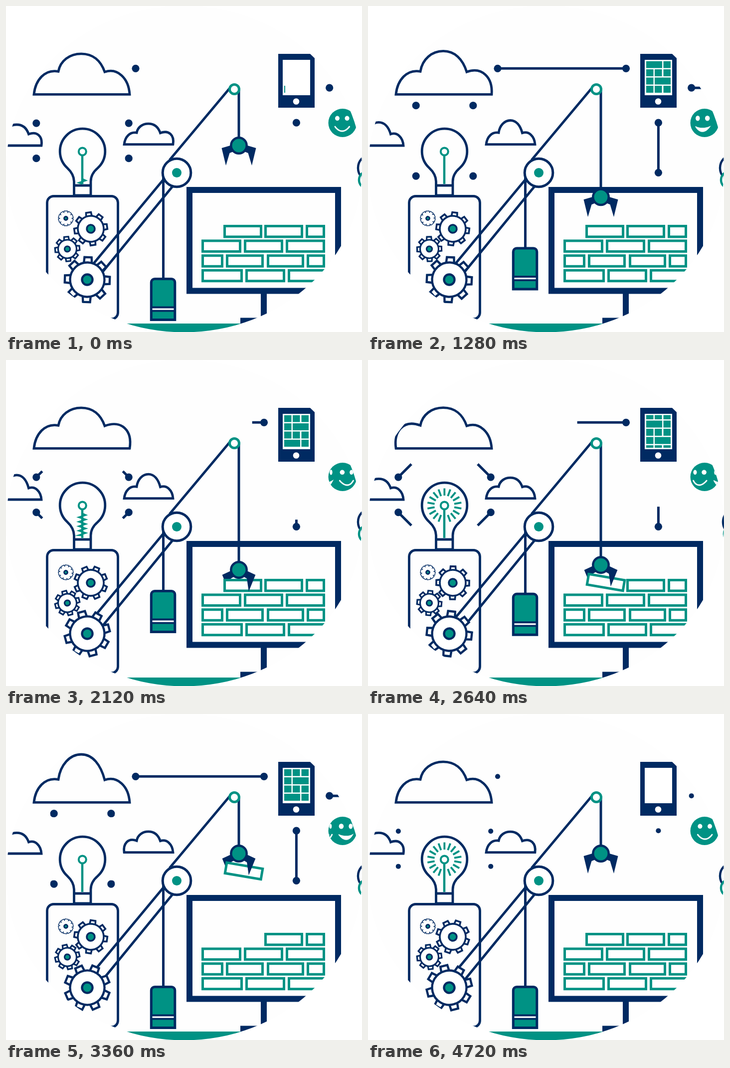
Animation, 714 px wide and 654 px high, one loop 4.76 s. Source, as an HTML page with a canvas:

```html
<!DOCTYPE html>
<html lang="en">
<head>
<meta charset="utf-8">
<title>Idea factory</title>
<style>
html, body { margin: 0; width: 714px; height: 654px; overflow: hidden; background: #fff; }
canvas { display: block; }
</style>
</head>
<body>
<canvas id="stage" width="714" height="654"></canvas>
<script>
const ctx = document.getElementById('stage').getContext('2d');
const NAVY = '#002a62', TEAL = '#009284', WHITE = '#fff';
const LOOP = 4760, STEP = 40, RAD = Math.PI / 180;

const lerp = (a, b, k) => a + (b - a) * k;
const ramp = (t, a, b) => Math.min(1, Math.max(0, (t - a) / (b - a)));
const smooth = (t, a, b) => { const k = ramp(t, a, b); return k * k * (3 - 2 * k); };
const bump = (t, mid, width) => Math.sin(Math.PI * ramp(t, mid - width / 2, mid + width / 2)) ** 2;

function keyed(t, times, values) {
  let i = 0;
  while (i < times.length - 2 && t >= times[i + 1]) i++;
  return lerp(values[i], values[i + 1], ramp(t, times[i], times[i + 1]));
}

function paint(fill, stroke, width = 5) {
  if (fill) { ctx.fillStyle = fill; ctx.fill(); }
  if (stroke) { ctx.strokeStyle = stroke; ctx.lineWidth = width; ctx.stroke(); }
}
function circle(x, y, r, fill, stroke, width) {
  ctx.beginPath(); ctx.arc(x, y, Math.max(0, r), 0, 7); paint(fill, stroke, width);
}
function box(x, y, w, h, fill, stroke, width) {
  ctx.beginPath(); ctx.rect(x, y, w, h); paint(fill, stroke, width);
}
function poly(points, fill, stroke, width) {
  ctx.beginPath(); points.forEach(p => ctx.lineTo(p[0], p[1])); paint(fill, stroke, width);
}
const line = (x1, y1, x2, y2, color = NAVY, width = 5) =>
  poly([[x1, y1], [x2, y2]], null, color, width);
function path(d, fill, stroke, width) {
  const p = new Path2D(d);
  if (fill) { ctx.fillStyle = fill; ctx.fill(p); }
  ctx.strokeStyle = stroke; ctx.lineWidth = width; ctx.stroke(p);
}
function at(x, y, degrees, draw) {
  ctx.save(); ctx.translate(x, y); ctx.rotate(degrees * RAD); draw(); ctx.restore();
}

// The lobes swell one after another: right, top, left.
function cloud(x, y, s, phase) {
  const p = phase % 952;
  const R = 8 * bump(p, 230, 420), T = 15 * bump(p, 485, 530), L = 8 * bump(p, 740, 340);
  const curve = pts => ctx.bezierCurveTo(...pts.map((v, i) => (i % 2 ? y : x) + v * s));
  ctx.beginPath();
  ctx.moveTo(x - 96 * s, y);
  curve([-93 - L, -29 - L / 2, -74 - L, -51 - L, -47, -46]);
  curve([-43, -68 - T / 2, -24, -81.5 - T, -1, -81.5 - T]);
  curve([22, -81.5 - T, 38, -68 - T / 2, 46, -45]);
  curve([72 + R, -54 - R / 2, 94 + R, -32 - R / 2, 96, 0]);
  ctx.closePath();
  paint(null, NAVY, 4.8);
}

// A line shoots from one dot to the other, then back in the next cycle.
const SLOW = { period: 2380, grow: 620, shrink: 1626, time: 608 };
const FAST = { period: 1190, grow: 390, shrink: 710, time: 360 };
function link(t, ax, ay, bx, by, c, soft = 1) {
  const u = t % c.period;
  if (Math.floor(t / c.period) % 2) [ax, ay, bx, by] = [bx, by, ax, ay];
  const ease = (a, b) => lerp(ramp(u, a, b), smooth(u, a, b), soft);
  const head = ease(0, c.grow), tail = ease(c.shrink, c.shrink + c.time);
  if (head > tail) {
    line(lerp(ax, bx, tail), lerp(ay, by, tail), lerp(ax, bx, head), lerp(ay, by, head));
  }
  const dip = Math.min(1, Math.abs(u - c.period + 80) / 60);
  circle(ax, ay, 7.6 * (1 - ramp(u, c.shrink - 60, c.shrink)), NAVY);
  circle(bx, by, 7.6 * ramp(u, c.grow - 60, c.grow) * dip, NAVY);
}

function gear(x, y, r, outer, hub, teeth, angle, width, merged) {
  at(x, y, angle, () => {
    const w = (outer - r) * 0.62 + 0.6;
    const tooth = (fill, stroke) => {
      for (let i = 0; i < teeth; i++) {
        at(0, 0, i * 360 / teeth, () =>
          poly([[-w - 1, 3 - r], [-w, -outer], [w, -outer], [w + 1, 3 - r]], fill, stroke, width));
      }
    };
    tooth(WHITE, NAVY);
    circle(0, 0, r, WHITE, NAVY, width);
    if (merged) { tooth(WHITE); circle(0, 0, r, WHITE); }
    circle(0, 0, hub, TEAL, NAVY, width);
  });
}

function gears(t) {
  const times = [0, 1280, 2120, 2640, 3360, 4120, 4720, LOOP];
  const turn = t / LOOP;
  gear(120, 426, 10.5, 14, 3.5, 10, -144 * turn, 2.8, true);
  gear(170, 447, 26, 33, 8, 8, keyed(t, times, [-8, -38, -68, -89, -127, -158, -161, -188]), 3.6);
  gear(123, 487.5, 18.5, 24.5, 5.5, 8, -5 + 180 * turn, 3.2);
  gear(163, 549, 34.5, 45, 10.5, 8, keyed(t, times, [2, 48, 75, 96, 112, 126, 166, 182]), 4.4);
}

function bulb(t) {
  const p = t % 952;
  path('M136.5 380V352Q136 337 123 325A45.3 45.3 0 1 1 184 325Q170 337 170 352V380ZM136.5 360H170',
    null, NAVY, 4.8);
  line(153, 299, 153, 357, TEAL, 4.5);
  circle(153.3, 292, 7.5, null, TEAL, 4);
  if (p < 320) {
    const top = lerp(347, 308, smooth(p, 0, 200)), pts = [[153, top]];
    const bottom = lerp(357, 352, ramp(p, 0, 200));
    for (let y = top + 3, side = 1; y < bottom; y += 4.5, side = -side) pts.push([153 + side * 7, y]);
    pts.push([153, bottom]);
    poly(pts, null, TEAL, 3);
  }
  const glow = smooth(p, 560, 680) * (1 - smooth(p, 920, 950));
  if (glow > 0) {
    for (let i = 1; i < 18; i++) {
      at(153.3, 292, i * 20, () => line(0, 20, 0, lerp(20, 34.5, glow), TEAL, 3.8));
    }
  }
}

function phone(t) {
  box(546, 96, 73, 108, NAVY);
  box(555, 108, 55, 71, WHITE);
  circle(582, 191.5, 6.3, WHITE);
  const rows = [[0, 32, 34.5, 49], [0, 14.5, 17, 31.5, 34.5, 49], [0, 14.5, 17, 49], [0, 14.5, 17, 31.5, 34.5, 49]];
  const scroll = smooth(t, 1400, 1850) + 4 * smooth(t, 2140, 3040);
  const first = Math.floor(scroll);
  ctx.save();
  box(555, 110.5, 55, 65.5); ctx.clip();
  for (let i = 0; i < 5; i++) {
    const k = 3 - i;
    const shown = ramp(t, k * 120 - 8, k * 120 + 192) - ramp(t, 4000 - i * 100, 4150 - i * 100);
    const cells = rows[(first + i) % 4], y = 110.5 + (first + i - scroll) * 16.5;
    if (i === 4 && scroll === first) break;
    for (let j = 0; j < cells.length; j += 2) {
      const w = Math.min(cells[j + 1], 49 * shown) - cells[j];
      if (w > 0) box(558 + cells[j], y, w, 14, TEAL);
    }
  }
  ctx.restore();
}

// Two faces pass by on a turning ball.
function face(t) {
  const u = t % 2380;
  circle(675, 234.5, 28.5, TEAL);
  ctx.save();
  circle(675, 234.5, 28.5); ctx.clip();
  ctx.lineCap = 'round';
  for (let i = 0; i < 4; i++) {
    const turn = (i * 1190 - 20 - u) * 0.08, grin = i % 2;
    if (Math.abs(turn) > 85) continue;
    const px = a => 675 + 28 * Math.sin(Math.max(-90, Math.min(90, turn + a)) * RAD);
    for (const a of [-20.5, 20.5]) {
      const squash = Math.cos((turn + a) * RAD);
      if (squash <= 0) continue;
      ctx.beginPath();
      ctx.ellipse(px(a), 225.3, 4.8 * squash, grin ? 5.2 : 4.8, 0, 0, 7);
      paint(WHITE);
    }
    const curve = depth => Array.from({ length: 13 }, (_, k) => {
      const v = k / 6 - 1;
      return [px(31 * v), 242 + depth * (1 - v * v)];
    });
    if (grin) poly([...curve(3), ...curve(10).reverse()], WHITE, WHITE, 1.5);
    else poly(curve(9), null, WHITE, 2.8);
  }
  ctx.restore();
}

function pin(t) {
  const x = 6 * bump(t % 2380, 260, 300);
  circle(733 + x, 325, 27, WHITE, NAVY, 4.5);
  circle(725 + x, 349, 17, WHITE, TEAL, 4.5);
}

function brick(x, y, w, h = 26.5) {
  box(x + 2.5, y + 2.5, w - 5, h - 5, WHITE, TEAL, 5);
}

function monitor() {
  box(511, 577, 12, 50, NAVY);
  box(470, 625.5, 94, 12, NAVY);
  box(0, 637, 714, 20, TEAL);
  box(368, 369, 298, 202.5, null, NAVY, 12);
  [[518, 596, 601, 640], [392, 472, 477, 556, 561, 640],
   [392, 436, 441, 517, 523, 598, 603, 640], [392, 475, 480, 560, 565, 640]].forEach((row, r) => {
    for (let i = 0; i < row.length; i += 2) brick(row[i], 439 + r * 29.6, row[i + 1] - row[i]);
  });
}

function crane(t) {
  const drop = smooth(t, 416, 1725) - smooth(t, 2540, 3160) - 0.07 * Math.sin(Math.PI * ramp(t, 3160, 3350));
  const hub = 280 + 141 * drop, top = 547.5 - 84 * drop;

  line(449, 164.5, 328, 309);
  line(320, 343, 172, 521);
  line(338, 357, 190, 538);
  line(315.5, 338, 315.5, top);
  circle(342.5, 334.5, 28.3, WHITE, NAVY, 5);
  circle(342.5, 334.5, 9.5, TEAL);

  ctx.beginPath();
  ctx.roundRect(291.3, top, 47.5, 82, [7, 7, 0, 0]);
  paint(TEAL, NAVY, 5);
  box(291.3, top + 55, 47.5, 11, NAVY);
  box(293.5, top + 59, 43, 3.2, WHITE);

  const closed = smooth(t, 1750, 2050) - smooth(t, 4180, 4300);
  const held = smooth(t, 2540, 2640) * (1 - ramp(t, 4250, 4500) ** 2);
  const claw = side => at(467, hub, side * 8.5 * closed, () =>
    poly([[34.5, 5], [14, -1], [11, 12], [18.5, 15], [26, 40]].map(([x, y]) => [side * x, y]), NAVY));
  line(467, 167, 467, hub);
  claw(-1);
  at(lerp(475, 477, held), lerp(452.3, hub + 35, held), 9.7 * held, () => brick(-39, -13.3, 78));
  claw(1);
  circle(467, hub, 15.7, TEAL, NAVY, 4.5);
  circle(458, 167, 9.5, WHITE, TEAL, 5);
}

function draw(t) {
  ctx.clearRect(0, 0, 714, 654);
  ctx.save();
  ctx.beginPath();
  ctx.ellipse(357, 327, 357, 327.5, 0, 0, 7);
  ctx.clip();
  paint('#fefefe');

  cloud(152, 177.3, 1, t);
  cloud(286, 277.7, 0.51, t + 220);
  cloud(22, 280, 0.51, t + 260);

  link(t, 260, 125.3, 517.5, 125.3, SLOW);
  link(t, 582.4, 234.2, 582.4, 334.3, SLOW, 0.5);
  link(t, 648.7, 164.2, 906, 164.2, SLOW);
  for (const [sx, sy] of [[-1, -1], [1, -1], [-1, 1], [1, 1]]) {
    link(t, 153.5 + sx * 92.7, 270.4 + sy * 35.3, 153.5 + sx * 57.3, 270.4 + sy * 70.7, FAST);
  }

  bulb(t);
  ctx.beginPath();
  ctx.roundRect(82.5, 381.5, 142, 246.5, 13);
  paint(null, NAVY, 4.8);
  monitor();
  crane(t);
  gears(t);
  phone(t);
  face(t);
  pin(t);
  ctx.restore();
}

const start = performance.now();
function frame() {
  draw(Math.floor((performance.now() - start) / STEP) * STEP % LOOP);
  requestAnimationFrame(frame);
}
frame();
</script>
</body>
</html>
```
